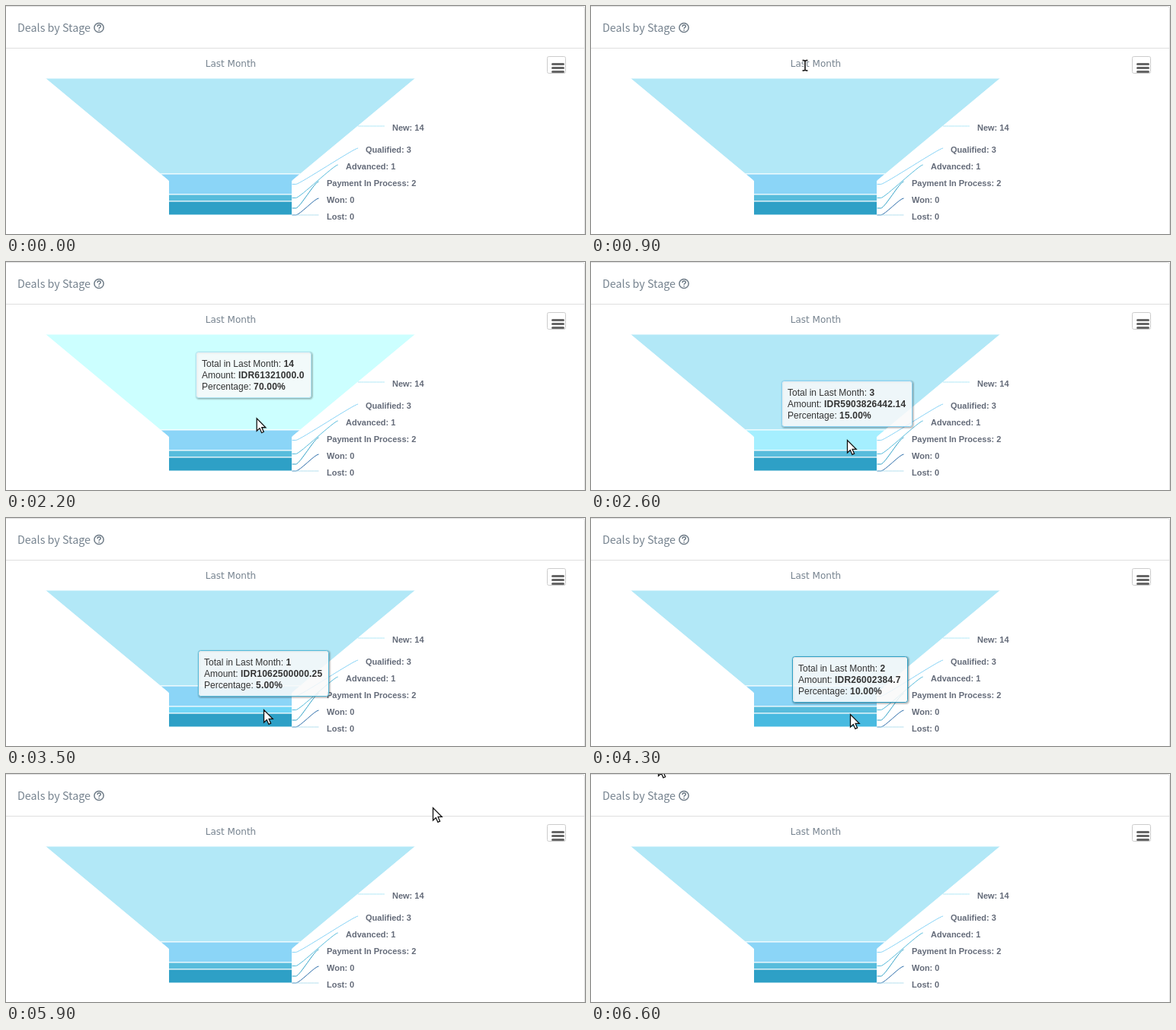
An HTML page that plays this animation: 760 by 300 pixels, repeating every 7 s.

```html
<!DOCTYPE html>
<html lang="en">
<head>
<meta charset="utf-8">
<title>Deals by Stage</title>
<style>
  html, body { margin: 0; width: 100%; height: 100%; overflow: hidden; background: #fff; }
  svg { display: block; width: 760px; height: 300px; }
  text { white-space: pre; }
  .heading { font: 14.3px "Noto Sans CJK SC", "Noto Sans CJK JP", "Noto Sans CJK", "Noto Sans", sans-serif; fill: #76838f; }
  .title { font: 12px "DejaVu Sans", sans-serif; fill: #76838f; text-anchor: middle; }
  .label { font: bold 11px "Liberation Sans", Arial, sans-serif; fill: #646b79; }
  .tip { font: 12px "Liberation Sans", Arial, sans-serif; fill: #333; }
  .tip tspan { font-weight: bold; letter-spacing: .2px; }
  .tip .box { fill: #f9f9f9; fill-opacity: .85; }
  .tip .shadow { fill: none; stroke: #000; }
  .line { fill: none; stroke: #dfdfdf; }
</style>
</head>
<body>
<svg viewBox="0 0 760 300">
  <path class="line" d="M0 .5H756.5a3 3 0 0 1 3 3V300M0 55.5H759"/>
  <text class="heading" x="15" y="34">Deals by Stage</text>
  <g fill="none" stroke="#6e7b87" stroke-width="1.5">
    <circle cx="122" cy="28.5" r="6.1"/>
    <path d="M119.9 27.2q.2-2.2 2.2-2.2 2.2 0 2.2 1.8 0 1-1.2 1.6-1 .5-1 1.6M122.1 31v1.5"/>
  </g>
  <rect x="710.5" y="66.5" width="24" height="22" rx="2" fill="#fff" stroke="#ccc"/>
  <path d="M717.5 76.5h14m-14 5h14m-14 5h14" stroke="#666" stroke-width="3" stroke-linecap="round"/>
  <text class="title" x="295" y="80">Last Month</text>
  <g id="funnel" stroke="#fff"></g>
  <g id="labels" fill="none"></g>
  <g id="tip" class="tip">
    <rect class="shadow" x="1" y="1" height="60" rx="3" stroke-width="5" stroke-opacity=".05"/>
    <rect class="shadow" x="1" y="1" height="60" rx="3" stroke-width="3" stroke-opacity=".1"/>
    <rect class="shadow" x="1" y="1" height="60" rx="3" stroke-opacity=".15"/>
    <rect class="box" height="60" rx="3"/>
    <text x="7.5" y="19.5">Total in Last Month: <tspan></tspan></text>
    <text x="7.5" y="34.5">Amount: <tspan></tspan></text>
    <text x="7.5" y="49.5">Percentage: <tspan></tspan></text>
  </g>
  <path id="arrow" d="M.5 .5V17L4.3 13.5 6.9 19.4 9.6 18.2 7.1 12.4H12.2Z" fill="#fff" stroke="#111" stroke-width="1.3"/>
  <g id="beam" fill="none">
    <path id="beamShape" d="M-3.5-6.5H-1.5L0-5.5 1.5-6.5H3.5M0-5.5V6M-3.5 7H-1.5L0 6 1.5 7H3.5" stroke="#fff" stroke-width="3.6"/>
    <path d="M-3.5-6.5H-1.5L0-5.5 1.5-6.5H3.5M0-5.5V6M-3.5 7H-1.5L0 6 1.5 7H3.5" stroke="#111" stroke-width="1.6"/>
  </g>
</svg>
<script>
const LOOP = 7000, STEP = 100, HIDE_DELAY = 500;
const $ = id => document.getElementById(id);

const stages = [
  { name: 'New', count: 14, color: '#b2e8f7', hover: '#ccffff', amount: 'IDR61321000.0' },
  { name: 'Qualified', count: 3, color: '#8bd5f7', hover: '#a5efff', amount: 'IDR5903826442.14' },
  { name: 'Advanced', count: 1, color: '#57bcdc', hover: '#71d6f6', amount: 'IDR1062500000.25' },
  { name: 'Payment In Process', count: 2, color: '#2ea0c6', hover: '#48bae0', amount: 'IDR26002384.7' },
  { name: 'Won', count: 0, color: '#2f6fab' },
  { name: 'Lost', count: 0, color: '#b5dfee' }
];
const total = stages.reduce((sum, s) => sum + s.count, 0);

// Funnel geometry: a quarter of the height is a straight neck
const TOP = 95, BOTTOM = 275, NECK = 230, CENTER = 294.5;
const halfWidth = y => 81 + 1.2 * Math.max(0, NECK - y);

function drawChart() {
  let y = TOP, shapes = '', labels = '';
  stages.forEach((s, i) => {
    s.top = y;
    s.bottom = y += s.count / total * (BOTTOM - TOP);
    if (s.count) {
      const rows = [s.top, Math.min(Math.max(NECK, s.top), s.bottom), s.bottom];
      const left = rows.map(r => `${CENTER - halfWidth(r)},${r}`);
      const right = rows.map(r => `${CENTER + halfWidth(r)},${r}`).reverse();
      shapes += `<polygon points="${[...left, ...right].join(' ')}"/>`;
    }
    // Labels sit beside their stage, pushed up to keep 22px between them
    const middle = (s.top + s.bottom) / 2;
    const lineY = Math.min(Math.round(middle), BOTTOM - 22 * (stages.length - 1 - i));
    const x = CENTER + halfWidth(lineY) + 35;
    const edge = CENTER + halfWidth(middle);
    labels += `<path d="M${x} ${lineY}C${x - 5} ${lineY} ${edge + 10} ${middle} ${edge + 5} ${middle}H${edge}" stroke="${s.color}"/>` +
      `<text class="label" x="${Math.round(x + 10)}" y="${lineY + 6}">${s.name}: ${s.count}</text>`;
  });
  $('funnel').innerHTML = shapes;
  $('labels').innerHTML = labels;
}

// Key points of the pointer: time, x, y
const pointerPath = [
  [500, 262, 0], [900, 281, 78], [1200, 295, 212], [1600, 295, 212],
  [1700, 314, 148], [1800, 314, 148], [2400, 336, 234], [2900, 336, 234],
  [3500, 338, 252], [4000, 338, 252], [4200, 340, 258], [4700, 340, 258],
  [5000, 342, 260], [5200, 342, 260], [5300, 367, 262], [5600, 636, 274],
  [5900, 560, 44], [6400, 24, 18], [6600, 88, -14.5]
];

function pointerAt(t) {
  if (t < pointerPath[0][0]) return null;
  const next = pointerPath.findIndex(p => p[0] > t);
  if (next < 0) return pointerPath.at(-1).slice(1);
  const [t0, x0, y0] = pointerPath[next - 1], [t1, x1, y1] = pointerPath[next];
  const k = (t - t0) / (t1 - t0);
  return [x0 + (x1 - x0) * k, y0 + (y1 - y0) * k];
}

const stageAt = ([x, y]) => Math.abs(x - CENTER) < halfWidth(y)
  ? stages.findIndex(s => y >= s.top && y < s.bottom) : -1;

// The tooltip covers half of its remaining way to the pointer in every step
function stateAt(now) {
  let tip = null, hovered = -1;
  for (let t = 0; t <= now; t += STEP) {
    const pointer = pointerAt(t);
    hovered = pointer ? stageAt(pointer) : -1;
    if (hovered >= 0) {
      tip = tip || { position: pointer };
      Object.assign(tip, { stage: hovered, goal: pointer, seen: t });
    }
    if (!tip) continue;
    tip.position = tip.position.map((v, i) => (v + tip.goal[i]) / 2);
    if (t - tip.seen >= HIDE_DELAY) tip = null;
  }
  return { tip, hovered, pointer: pointerAt(now) };
}

const show = (el, on) => el.setAttribute('visibility', on ? 'visible' : 'hidden');
const move = (el, x, y) => el.setAttribute('transform', `translate(${x} ${y})`);

function drawTip(tip) {
  show($('tip'), tip);
  if (!tip) return;
  const s = stages[tip.stage];
  const values = [s.count, s.amount, (s.count / total * 100).toFixed(2) + '%'];
  $('tip').querySelectorAll('tspan').forEach((el, i) => el.textContent = values[i]);
  const lengths = [...$('tip').querySelectorAll('text')].map(el => el.getComputedTextLength());
  const width = Math.round(Math.max(...lengths) + 16);
  $('tip').querySelectorAll('rect').forEach(el => el.setAttribute('width', width));
  $('tip').querySelector('.box').setAttribute('stroke', s.color);
  const [x, y] = tip.position;
  move($('tip'), Math.round(x - width / 2) + .5, Math.round(y - 75) + .5);
}

function drawPointer(pointer) {
  const [x, y] = pointer || [0, 0];
  const overText = [...document.querySelectorAll('.title, .heading')].some(el => {
    const box = el.getBBox();
    return x > box.x && x < box.x + box.width && y > box.y && y < box.y + box.height;
  });
  show($('arrow'), pointer && !overText);
  show($('beam'), pointer && overText);
  move($('arrow'), x, y);
  move($('beam'), x, y);
}

function render(t) {
  const { tip, hovered, pointer } = stateAt(t);
  [...$('funnel').children].forEach((el, i) =>
    el.setAttribute('fill', i === hovered ? stages[i].hover : stages[i].color));
  drawTip(tip);
  drawPointer(pointer);
}

drawChart();
const start = performance.now();
function tick() {
  const t = (performance.now() - start) % LOOP;
  render(Math.floor(t / STEP) * STEP);
  requestAnimationFrame(tick);
}
tick();
</script>
</body>
</html>
```
